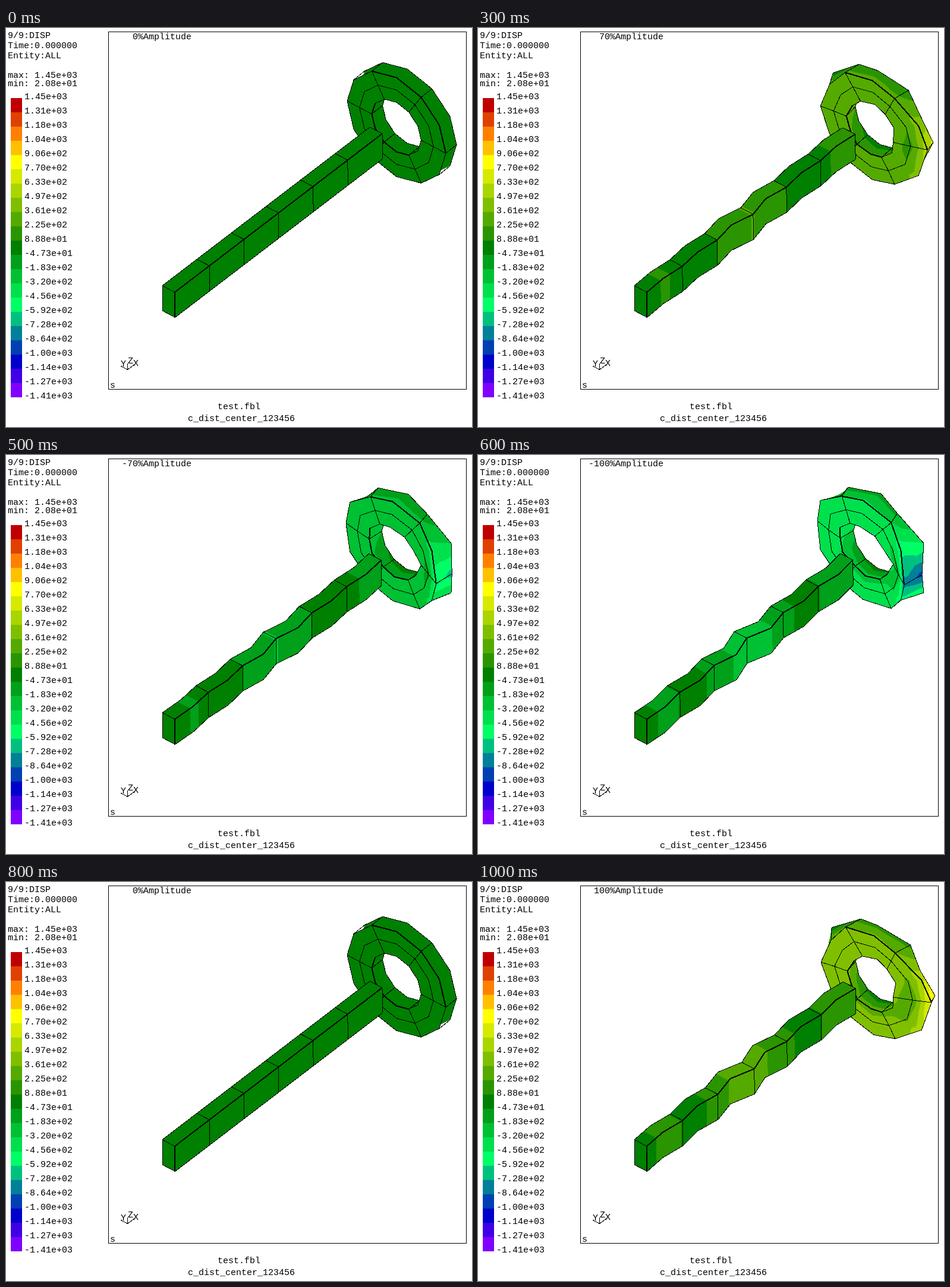
Recreate the animation shown at these times as an HTML page. Size 784 by 672 pixels, loop 1.1 s.

```html
<!DOCTYPE html>
<html lang="en">
<head>
<meta charset="utf-8">
<title>Vibration mode</title>
<style>
  html, body { margin: 0; width: 100%; height: 100%; overflow: hidden; background: #fff; }
  svg { display: block; width: 784px; height: 672px; }
  text { font: 15px "Liberation Mono", "DejaVu Sans Mono", monospace; white-space: pre; }
  .line { fill: none; stroke: #000; stroke-linejoin: round; }
</style>
</head>
<body>
<svg viewBox="0 0 784 672" shape-rendering="crispEdges">
  <rect class="line" x="172.5" y="6.5" width="602" height="602"/>
  <g id="legend"></g>
  <text x="3" y="17">9/9:DISP</text>
  <text x="3" y="34">Time:0.000000</text>
  <text x="3" y="51">Entity:ALL</text>
  <text x="3" y="84">max: 1.45e+03</text>
  <text x="3" y="98">min: 2.08e+01</text>
  <text id="amplitude" x="312" y="19" text-anchor="end"></text>
  <g id="model"></g>
  <path class="line" d="M193.5 569.5l11 6l12 -9M204.5 575.5v-11"/>
  <text x="193" y="570">Y</text>
  <text x="205" y="565">Z</text>
  <text x="214" y="569">X</text>
  <text x="175" y="606">s</text>
  <text x="356" y="642">test.fbl</text>
  <text x="306" y="662">c_dist_center_123456</text>
</svg>
<script>
const colors = ('#c00000 #e04000 #ff8000 #ffc000 #ffff00 #d5ea00 #aad500 #80bf00 #55aa00 #2a9500 #008000 ' +
  '#00a01a #00c033 #00e04d #00ff66 #00c080 #008099 #0040b3 #0000cc #4000e6 #8000ff').split(' ');
const BAND = 138, ZERO_BAND = 10;

const el = id => document.getElementById(id);
const range = (from, to) => Array.from({ length: to - from + 1 }, (_, i) => from + i);
const fix = n => +n.toFixed(2);
const alternate = k => k % 2 ? -1 : 1;

function drawLegend() {
  const label = i => (1450.33 - i * 136.15).toExponential(2).replace(/(\d)$/, m => m.padStart(2, '0'));
  el('legend').innerHTML =
    colors.map((c, i) => `<rect x="8" y="${118 + 24 * i}" width="19" height="24" fill="${c}"/>`).join('') +
    range(0, colors.length).map(i => `<text x="31" y="${120 + 24 * i}">${label(i)}</text>`).join('');
}

// Peak movement and field value around each edge of the ring:
// mean, alternation between nodes, peak at the near end, peak at the far end, sine around the ring
const modes = {
  outer: { dx: [6, -3, 0, 20], dy: [5, -2, 9, -11], v: [360, -20, 0, 460] },
  middle: { dx: [7, -2, 0, 7, 2], dy: [5, -1, 4, -5], v: [430, 20, 0, -230] },
  inner: { dx: [8, -2, 0, -6, 5], dy: [5], v: [380, 0, 0, 0, 100] },
  outerBack: { dx: [4, 7, -12, 0], dy: [4, 0, 0, -9], v: [150, 0, -500, 800] },
  innerBack: { dx: [2], dy: [3], v: [300, 0, 0, 0, 320] }
};

function wave([mean, alt = 0, near = 0, far = 0, side = 0], k) {
  const c = Math.cos(k * Math.PI / 6), peak = c ** 6;
  return mean + alt * alternate(k) + (c > 0 ? near : far) * peak + side * Math.sin(k * Math.PI / 6);
}

// Twelve nodes [x, y, value] on a circle seen at an angle
function ring(mode, amp, radius, back = 0) {
  return range(0, 11).map(k => {
    const c = radius * Math.cos(k * Math.PI / 6), s = radius * Math.sin(k * Math.PI / 6);
    return [657 - 83 * c + 18 * back + amp * wave(mode.dx, k),
      167 - 44 * c - 83.5 * s - 14.5 * back + amp * wave(mode.dy, k),
      amp * wave(mode.v, k)];
  });
}

// Thirteen nodes along the beam; the zigzag is strongest halfway and zero at the clamped end
function beamEdge(x, y, amp) {
  return range(0, 12).map(k => {
    const free = Math.min(k, 1), bump = Math.exp(-((k - 6) ** 2) / 2.5);
    const shift = amp * free * alternate(k) * (2.3 + 4 * bump);
    const value = amp * free * (90 + 50 * Math.cos((k - 6) * Math.PI / 3) + 160 * bump);
    return [x + 349 / 12 * k + shift, y - 267 / 12 * k + shift / 2, value];
  });
}

// Keeps the part of a polygon whose value is above (sign 1) or below (sign -1) a level
function clip(poly, level, sign) {
  const out = [];
  poly.forEach((a, i) => {
    const b = poly[(i + 1) % poly.length];
    const da = sign * (a[2] - level), db = sign * (b[2] - level);
    if (da >= 0) out.push(a);
    if (da * db < 0) out.push(a.map((n, j) => n + (b[j] - n) * da / (da - db)));
  });
  return out;
}

const trace = pts => 'M' + pts.map(p => fix(p[0]) + ' ' + fix(p[1])).join('L');

// Fills quads with banded colours, one path for each band
function fill(quads) {
  const paths = {};
  for (const quad of quads) {
    const mid = [0, 1, 2].map(j => quad.reduce((sum, p) => sum + p[j], 0) / 4);
    quad.forEach((a, i) => {
      const tri = [a, quad[(i + 1) % 4], mid], vals = tri.map(p => p[2]);
      const low = Math.round(Math.min(...vals) / BAND), high = Math.round(Math.max(...vals) / BAND);
      for (const band of range(low, high)) {
        const part = clip(clip(tri, (band - .5) * BAND, 1), (band + .5) * BAND, -1);
        if (part.length > 2) paths[band] = (paths[band] || '') + trace(part) + 'Z';
      }
    });
  }
  return Object.entries(paths).map(([band, d]) =>
    `<path fill="${colors[ZERO_BAND - band]}" d="${d}"/>`).join('');
}

const stroke = (lines, width = 1) =>
  `<path class="line" stroke-width="${width}" d="${lines.map(trace).join('')}"/>`;
const pick = (pts, from, to) => range(from, to).map(k => pts[k % pts.length]);
const loop = pts => pick(pts, 0, pts.length);
const strip = (a, b) => range(0, a.length - 2).map(k => [a[k], a[k + 1], b[k + 1], b[k]]);
const rungs = (a, b) => range(0, a.length - 1).filter(k => k % 2 == 0).map(k => [a[k], b[k]]);

function drawRing(amp) {
  const outer = ring(modes.outer, amp, 1), outerBack = ring(modes.outerBack, amp, 1, 1);
  const middle = ring(modes.middle, amp, .75);
  const inner = ring(modes.inner, amp, .5), innerBack = ring(modes.innerBack, amp, .5, 1);
  const band = (a, b) => fill(strip(loop(a), loop(b)));
  const outline = [1, 7].map(k => [outer[k], outerBack[k]]);
  return band(inner, innerBack) + stroke([pick(innerBack, 8, 13), ...rungs(inner, innerBack)]) +
    band(outer, outerBack) + stroke([pick(outerBack, 1, 7), ...outline, ...rungs(outer, outerBack)]) +
    band(outer, middle) + band(middle, inner) +
    stroke([loop(outer), loop(middle), loop(inner), ...rungs(outer, middle), ...rungs(middle, inner)]) +
    stroke([pick(outer, 2, 6), pick(inner, 8, 13)], 2);
}

function drawBeam(amp) {
  const top = beamEdge(263, 434, amp), ridge = beamEdge(284, 445, amp);
  const bottom = beamEdge(284.5, 487.5, amp);
  const end = [top[0], ridge[0], bottom[0], [263, 476, 0]];
  return fill([...strip(top, ridge), ...strip(ridge, bottom), end]) +
    stroke([top, bottom, ...rungs(top, ridge), ...rungs(ridge, bottom), [...end, end[0]]]) +
    stroke([ridge, [ridge[0], bottom[0]]], 2);
}

let shown = -1;
function frame() {
  const step = Math.floor(performance.now() % 1100 / 100);
  if (step !== shown) {
    shown = step;
    const amp = Math.sin(step % 8 * Math.PI / 4);
    el('amplitude').textContent = `${Math.trunc(amp * 100)}%Amplitude`;
    el('model').innerHTML = drawRing(amp) + drawBeam(amp);
  }
  requestAnimationFrame(frame);
}

drawLegend();
frame();
</script>
</body>
</html>
```
